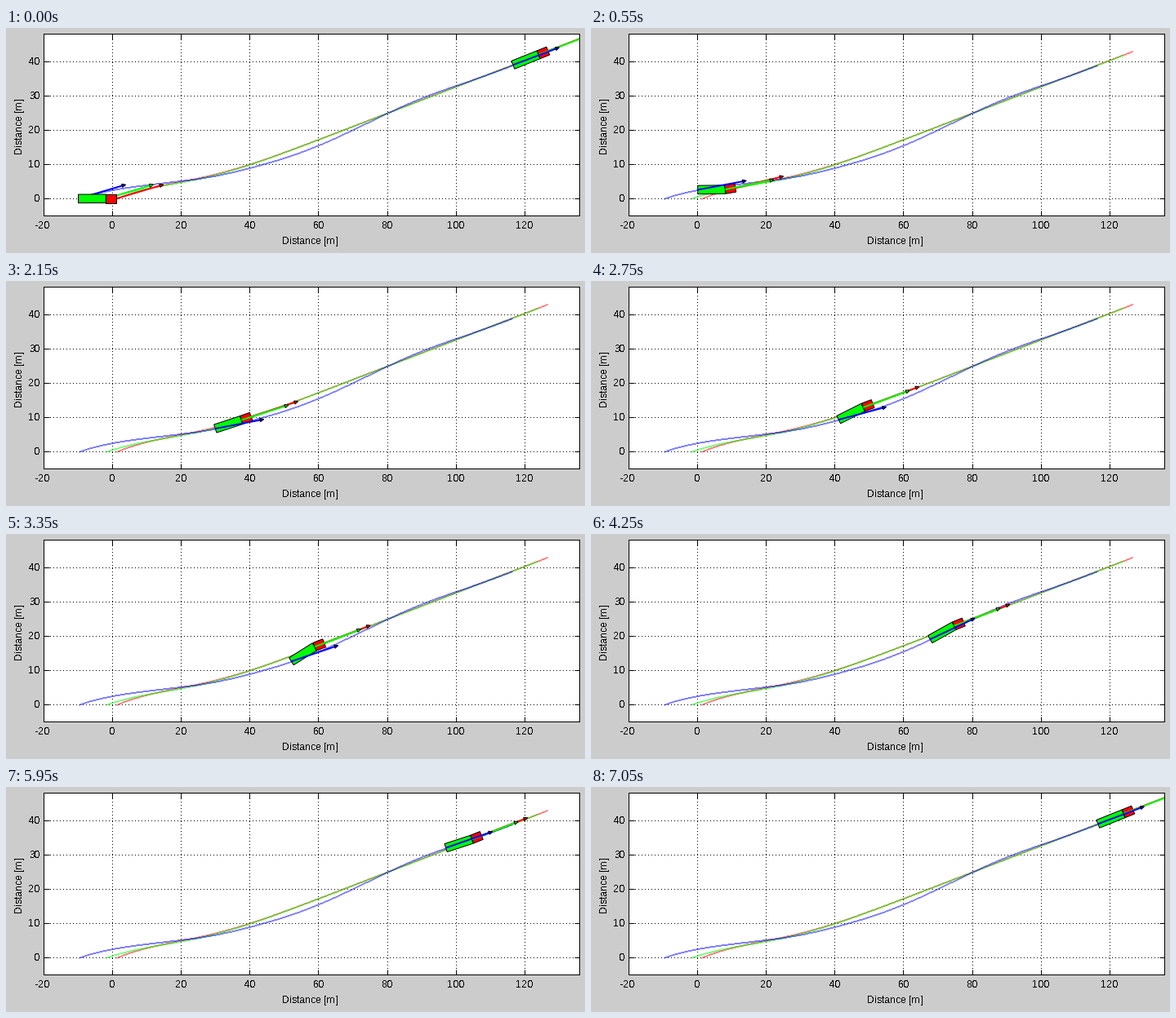
Write a matplotlib script that moves like this. It is 709 by 276 pixels and loops after 7.1 s.

```python
import numpy as np
import matplotlib
import matplotlib.pyplot as plt
from matplotlib.animation import FuncAnimation
from matplotlib.patches import Polygon
from matplotlib.transforms import Affine2D

W, H, DPI = 709, 276, 64
PX = 72 / DPI  # points per pixel
FRAMES = 142
RED, GREEN, BLUE = "#ff0000", "#00ff00", "#0000ff"
LEFT, RIGHT, TOP, BOTTOM = 46, 702, 7, 230
X0, X1, Y0, Y1 = -20, 136, -5, 48
UX, UY = (X1 - X0) / (RIGHT - LEFT), (Y1 - Y0) / (BOTTOM - TOP)  # one pixel
TRAILER, TRACTOR, HALF_W = 8.0, 3.0, 1.25
ARROW, HEAD_LEN, HEAD_W = 14.4, 1.1, 0.5

matplotlib.rcParams.update({
    "font.family": "Liberation Sans",
    "font.size": 12 * PX,
    "text.antialiased": False,
    "text.hinting_factor": 1,
})


def bump(x, centre, width):
    return np.exp(-((x - centre) / width) ** 2)


def unit(angle):
    return np.stack([np.cos(angle), np.sin(angle)], axis=-1)


# The hitch follows a straight road after a soft bend, at constant speed
xs = np.linspace(-2, 124, 3000)
ys = 0.385 * xs - 5.75 + 6.6 * bump(xs, -4, 26.5)
arc = np.concatenate([[0], np.cumsum(np.hypot(np.diff(xs), np.diff(ys)))])
s = np.linspace(0, arc[-1], FRAMES)
hx = np.interp(s, arc, xs)
hitch = np.column_stack([hx, np.interp(s, arc, ys)])

# The tractor turns in quickly; the trailer lags, overshoots and settles
tractor_dir = np.radians(22 * (1 - np.exp(-(hx + 2) / 18)))
trailer_dir = np.radians(22 / (1 + np.exp((30.5 - hx) / 6.5))
                         + 11 * bump(hx, 63, 19) - 5 * bump(hx, 98, 14))

rear = hitch - TRAILER * unit(trailer_dir)
front = hitch + TRACTOR * unit(tractor_dir)
tracks = [(front, RED), (hitch, GREEN), (rear, BLUE)]


def heading(path):
    d = np.gradient(path, axis=0)
    return np.arctan2(d[:, 1], d[:, 0])


headings = [heading(path) for path, _ in tracks]


def box(start, angle, length):
    along, side = unit(angle) * length, unit(angle + np.pi / 2) * HALF_W
    return np.array([start + side, start + along + side,
                     start + along - side, start - side])


fig = plt.figure(figsize=(W / DPI, H / DPI), dpi=DPI, facecolor="#cccccc")
ax = fig.add_axes([LEFT / W, 1 - BOTTOM / H,
                   (RIGHT - LEFT) / W, (BOTTOM - TOP) / H])
ax.set(xlim=(X0, X1), ylim=(Y0, Y1),
       xticks=range(-20, 121, 20), yticks=range(0, 41, 10))
ax.tick_params(direction="in", top=True, right=True, length=6.5 * PX,
               width=PX, labelbottom=False, labelleft=False)
ax.grid(True, color="black", lw=PX, ls=(0.5, (1, 3)))
ax.set_axisbelow(True)
for spine in ax.spines.values():
    spine.set_linewidth(PX)

# Coordinates name pixels, so moving shapes sit on pixel centres
centred = ax.transData + Affine2D().translate(0.5, -0.5)


def label(x, y, text, **kw):
    fig.text(x / W, 1 - y / H, text, **kw)


for v in range(-20, 121, 20):
    x = LEFT + (v - X0) / UX
    label(x - (2 if v < 0 else 0), 246, str(v), ha="center", va="baseline")
for v in range(0, 41, 10):
    label(41.5, BOTTOM - (v - Y0) / UY + 4, str(v), ha="right", va="baseline")
label(372.5, 265, "Distance [m]", ha="center", va="baseline")
label(23, 120.5, "Distance [m]", rotation=90, ha="right", va="center")


def stairs(path, color):
    """One-pixel line without smoothing: one cell per pixel column."""
    x = np.arange(X0, X1, UX)
    x = x[(x >= path[0, 0]) & (x <= path[-1, 0])]
    y = np.interp(x, *path.T)
    top = Y0 + np.round((y - Y0) / UY) * UY
    ax.fill_between(x, top - UY, top, step="post", color=color, lw=0, zorder=2)


for path, color in tracks:
    stairs(path, color)


def add_polygon(color, z):
    return ax.add_patch(Polygon(np.zeros((4, 2)), fc=color, ec="black",
                                lw=PX, zorder=z, transform=centred))


class Arrow:
    def __init__(self, color, z):
        self.line, = ax.plot([], [], color=color, lw=2 * PX, zorder=z,
                             solid_capstyle="butt", transform=centred)
        self.head = add_polygon(color, z + 0.1)

    def place(self, start, angle):
        d, n = unit(angle), unit(angle + np.pi / 2) * HEAD_W
        tip = start + d * ARROW
        base = tip - d * HEAD_LEN
        self.line.set_data(*np.array([start, base]).T)
        self.head.set_xy([tip, base + n, base - n])

    def show(self, on):
        self.line.set_visible(on)
        self.head.set_visible(on)


trailer, tractor = add_polygon(GREEN, 3), add_polygon(RED, 3.1)
arrows = [Arrow(c, 4 + k) for k, (_, c) in enumerate(tracks)]

# Start pose, seen together with the end pose when the loop begins
start_arrows = [Arrow(c, 8 + k) for k, (_, c) in enumerate(tracks)]
for arrow, (path, _) in zip(start_arrows, tracks):
    arrow.place(path[0], np.radians(16.5))
start_boxes = [add_polygon(GREEN, 12), add_polygon(RED, 12.1)]
start_boxes[0].set_xy(box(rear[0], trailer_dir[0], TRAILER))
start_boxes[1].set_xy(box(hitch[0], tractor_dir[0], TRACTOR))


def update(frame):
    first = frame == 0
    i = FRAMES - 1 if first else frame
    trailer.set_xy(box(rear[i], trailer_dir[i], TRAILER))
    tractor.set_xy(box(hitch[i], tractor_dir[i], TRACTOR))
    for arrow, (path, _), angle in zip(arrows, tracks, headings):
        arrow.place(path[i], angle[i])
    for arrow in start_arrows:
        arrow.show(first)
    for patch in start_boxes:
        patch.set_visible(first)
    return []


anim = FuncAnimation(fig, update, frames=FRAMES, interval=50,
                     repeat=True, repeat_delay=0, blit=False)
plt.show()
```
